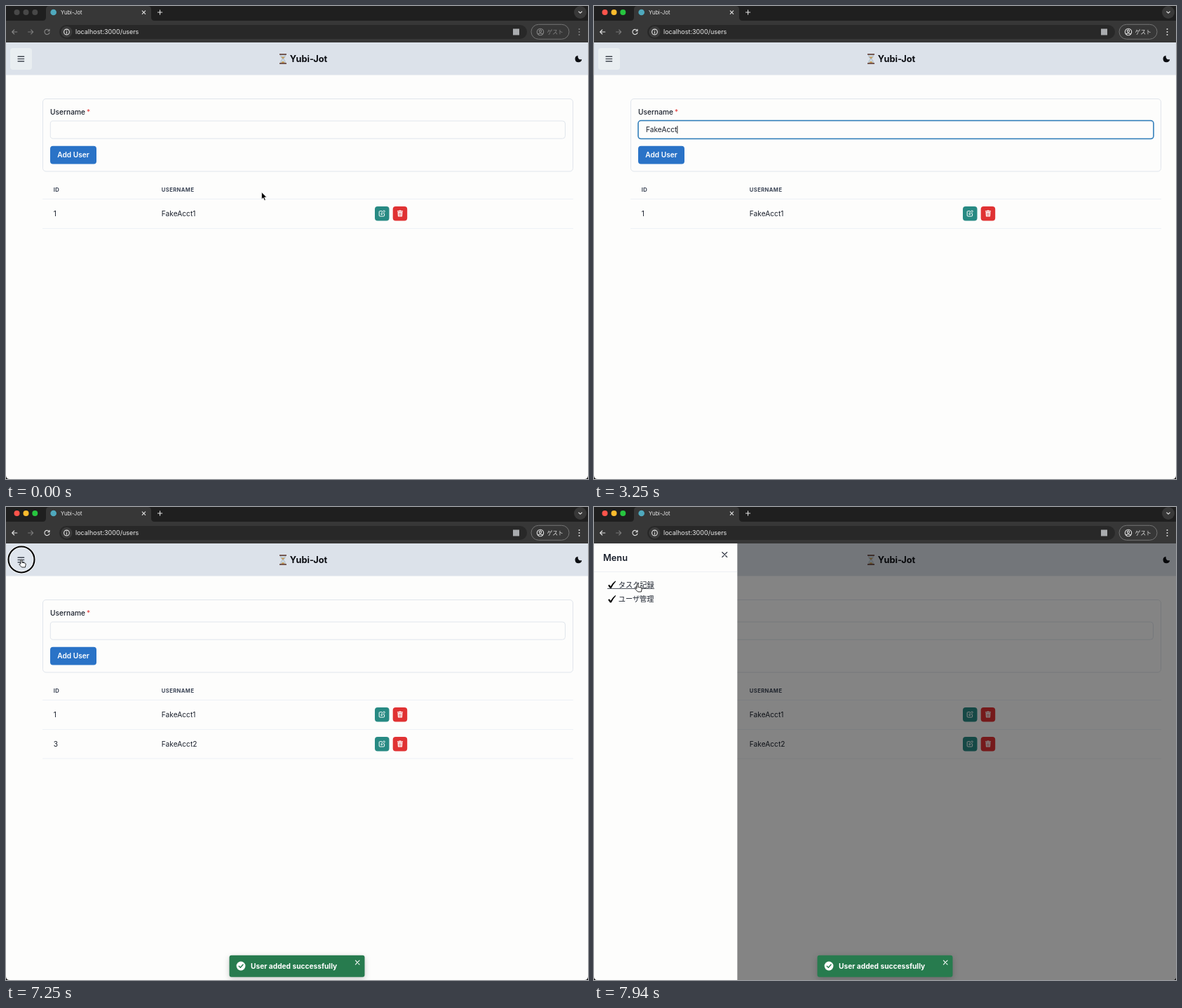
An HTML page for the animation above (8 s loop, 830x675 px).

```html
<!DOCTYPE html>
<html lang="ja">
<head>
<meta charset="utf-8">
<title>Yubi-Jot</title>
<style>
  html, body { margin: 0; width: 830px; height: 675px; overflow: hidden; background: #111; }
  svg { display: block; --icon: #e0e0e0; font: 10.2px Inter, "Noto Sans CJK JP", "Noto Sans CJK", sans-serif; }
  svg.inactive { --icon: #858585; }
  .line { fill: none; stroke-linecap: round; stroke-linejoin: round; }
  .chrome { stroke: var(--icon); stroke-width: 1.1; }
  .inactive .light { fill: #484848; }
  .head { font-size: 7.65px; font-weight: 700; letter-spacing: .05em; fill: #3d4657; }
  .ink { fill: #1a202c; }
</style>
</head>
<body>
<svg id="stage" width="830" height="675" viewBox="0 0 830 675">
  <defs>
    <clipPath id="window"><path d="M0 0H830V670Q830 675 825 675H5Q0 675 0 670Z"/></clipPath>
    <g id="actions">
      <rect x="526" y="286" width="20.5" height="20.5" rx="4" fill="#288a83"/>
      <rect x="551.7" y="286" width="20.5" height="20.5" rx="4" fill="#e03233"/>
      <path class="line" stroke="#fff" d="M536 292.7H533.2Q532.2 292.7 532.2 293.7V299Q532.2 300 533.2 300H538.6Q539.6 300 539.6 299V296.3M535 297.2L535.4 295.3 539 291.7 540.5 293.2 536.9 296.8Z"/>
      <path fill="#fff" d="M558 292.3H560.3L560.8 291.6H563.2L563.7 292.3H566V293.4H558ZM558.6 294H565.4L565 300.6H559Z"/>
      <path stroke="#e03233" stroke-width=".6" d="M560.6 295V299.5M562 295V299.5M563.4 295V299.5"/>
    </g>
    <path id="tick" d="M.3 5.9L2 4.8 4 7.3Q6.5 2.5 10.7-.5L11.4.2Q7.5 4.5 4.8 9.9L3.2 10Z"/>
  </defs>

  <g clip-path="url(#window)">
    <rect y="52" width="830" height="623" fill="#fdfdfc"/>

    <!-- Page -->
    <rect y="52" width="830" height="46.5" fill="#dce2ea"/>
    <rect id="menuButton" x="6" y="60" width="31" height="31" rx="4"/>
    <path class="line" stroke="#1a202c" stroke-width="1.2" d="M17 72.2H25.7M17 75.5H25.7M17 78.8H25.7"/>
    <path fill="#c9d8e2" stroke="#8b98a2" stroke-width=".5" d="M391.5 69.5H398.5Q398.5 73 395.7 75.4 398.5 78 398.5 81.5H391.5Q391.5 78 394.3 75.4 391.5 73 391.5 69.5Z"/>
    <path fill="#c79a55" d="M392.4 72.5H397.6L395 75.4ZM392.2 81.3Q395 76.5 397.8 81.3Z"/>
    <path stroke="#5b3328" stroke-width="1.7" d="M390 69H400M390 82H400"/>
    <text x="404.7" y="80" font-size="12.75" font-weight="700" fill="#0b0d12">Yubi-Jot</text>
    <path fill="#0b0d12" d="M815.2 70.7A4.9 4.9 0 1 0 821.2 76.6Q821.2 76 820.6 76.2A4.1 4.1 0 0 1 815.6 71.2Q815.7 70.6 815.2 70.7Z"/>

    <g fill="none" stroke="#e0e5ec">
      <rect x="52.5" y="132.5" width="756" height="103.5" rx="4.5"/>
      <rect x="63.3" y="164" width="734.2" height="25.2" rx="4"/>
      <path stroke="#edf1f6" d="M52 275.5H809M52 317.5H809"/>
    </g>
    <text x="63" y="154.5" font-weight="500" class="ink">Username</text>
    <text x="115" y="154.5" fill="#e53e3e">*</text>
    <rect id="focus" x="63" y="163.6" width="735" height="26" rx="4" fill="none" stroke="#2b7bb9" stroke-width="1.5"/>
    <text id="entry" x="74" y="180.2" class="ink"></text>
    <path id="caret" stroke="#111" stroke-width=".9" d="M0 171V182"/>
    <rect id="addButton" x="63" y="199.8" width="66" height="25.7" rx="4"/>
    <text x="73.2" y="215.9" font-weight="600" fill="#fff">Add User</text>

    <g class="head"><text x="67.7" y="264.7">ID</text><text x="221.8" y="264.7">USERNAME</text></g>
    <g class="ink"><text x="67.7" y="300">1</text><text x="221.8" y="300">FakeAcct1</text></g>
    <use href="#actions"/>
    <g id="newRow" class="ink">
      <text x="67.7" y="342">3</text><text x="221.8" y="342">FakeAcct2</text>
      <use href="#actions" y="42"/>
      <path stroke="#edf1f6" d="M52 359H809"/>
    </g>

    <!-- Drawer -->
    <rect id="overlay" y="52" width="830" height="623"/>
    <g id="drawer">
      <rect x="-30" y="52" width="234.3" height="623" fill="#fdfdfc"/>
      <text x="13" y="76.6" font-size="12.75" font-weight="600" class="ink">Menu</text>
      <path class="line" stroke="#2d3340" stroke-width="1.1" d="M182.7 64.5L189.7 71.5M189.7 64.5L182.7 71.5"/>
      <path stroke="#edf0f4" d="M0 92.5H204"/>
      <use href="#tick" x="19.7" y="106"/><use href="#tick" x="19.7" y="126.5"/>
      <text x="34.7" y="114.5" class="ink">タスク記録</text>
      <text x="34.7" y="135" class="ink">ユーザ管理</text>
      <path id="underline" stroke="#1a202c" stroke-width=".8" d="M19 116.4H86"/>
    </g>

    <!-- Toast -->
    <g id="toast">
      <rect x="318.5" y="639.7" width="193" height="31" rx="3" fill="#277b4e" style="filter:drop-shadow(0 3px 4px #0003)"/>
      <circle cx="335" cy="655" r="6.4" fill="#fff"/>
      <path class="line" stroke="#277b4e" stroke-width="1.4" d="M332.2 655.2L334.3 657.3 338 653"/>
      <text x="349" y="658.8" font-weight="700" fill="#fff">User added successfully</text>
      <path class="line" stroke="#fff" stroke-width="1.1" d="M498.4 647.2L504 652.8M504 647.2L498.4 652.8"/>
    </g>

    <!-- Browser bar -->
    <rect width="830" height="52" fill="#1f1f1f"/>
    <path fill="#373737" d="M0 21H52Q57 21 57 16V5Q57 0 62 0H202Q207 0 207 5V16Q207 21 212 21H830V52H0Z"/>
    <g>
      <circle class="light" cx="15.5" cy="9" r="4" fill="#ff544b"/>
      <circle class="light" cx="28.5" cy="9" r="4" fill="#fdbb2d"/>
      <circle class="light" cx="41.3" cy="9" r="4" fill="#27c53f"/>
    </g>
    <circle cx="67.7" cy="9" r="4.3" fill="#4fa9bd"/>
    <text x="78" y="11.7" font-size="7.65" fill="#e6e6e6">Yubi-Jot</text>
    <circle cx="819" cy="9" r="9" fill="#383838"/>
    <rect x="76" y="27" width="667" height="20" rx="10" fill="#282828"/>
    <circle cx="86.5" cy="37" r="8" fill="#3b3b3b"/>
    <g class="line" stroke="#e0e0e0" stroke-width="1.1">
      <path d="M194.3 6.9L198.7 11.3M198.7 6.9L194.3 11.3M216.5 9H222.7M219.6 5.9V12.1M816.8 8L819 10.2 821.2 8"/>
      <circle cx="86.5" cy="37" r="3.9"/><path d="M86.5 36.8V38.9M86.5 35V35.1"/>
    </g>
    <g class="line chrome">
      <path d="M15.8 37H8.7M11.7 34L8.7 37 11.7 40M61.8 35.4A3.6 3.6 0 1 0 62 38M62 33.4V35.8H59.6"/>
      <path stroke="#777" d="M31.6 37H38.7M35.7 34L38.7 37 35.7 40"/>
      <circle cx="762" cy="37" r="4.7"/><circle cx="762" cy="35.7" r="1.6"/><path d="M758.9 40Q762 37.2 765.1 40"/>
    </g>
    <text x="99" y="40.2" font-size="9" fill="#ececec">localhost:3000/users</text>
    <rect x="723" y="32.5" width="9" height="9" fill="#a9abae"/>
    <rect x="749" y="26.3" width="54" height="21" rx="10.5" fill="none" stroke="#747474"/>
    <text x="771.5" y="40" font-size="7.8" fill="var(--icon)">ゲスト</text>
    <g fill="var(--icon)"><circle cx="817.5" cy="33" r="1"/><circle cx="817.5" cy="37" r="1"/><circle cx="817.5" cy="41" r="1"/></g>

    <!-- Pointer -->
    <g id="pointer">
      <g id="ring" fill="none"><circle r="18.5" stroke="#fff" stroke-width="3.6"/><circle r="18.5" stroke="#000" stroke-width="2.1"/></g>
      <path id="arrow" stroke="#fff" stroke-width=".8" d="M0 0V10.4L2.4 8.2 4.1 11.9 5.9 11.1 4.2 7.5H7.4Z"/>
      <path id="beam" class="line" stroke="#111" stroke-width="1" d="M-2-5.2Q0-5.2 0-3.8V3.8Q0 5.2-2 5.2M2-5.2Q0-5.2 0-3.8M0 3.8Q0 5.2 2 5.2M-1 1.2H1"/>
      <path id="hand" fill="#fff" stroke="#111" stroke-width=".9" stroke-linejoin="round" d="M-1 6.2V1Q-1 0 0 0T1 1V4.3L2.8 4.5 4.3 4.9 5.5 5.3Q6.3 5.7 6.2 7L5.4 11H.5L-2.9 7.4Q-3.2 6.2-2 6Z"/>
    </g>
  </g>
</svg>
<script>
const LOOP = 8000, STEP = 62.5;
const PRESS_INPUT = 937, PRESS_ADD = 4687, ADDED = 4937, PRESS_MENU = 7187, DRAWER = 7298;
const NAME = "FakeAcct2";
const keys = [1875, 2062, 2187, 2500, 2687, 2875, 3062, 3187, 3562];
// Pointer stops: time, x, y
const path = [
  [0, 364.4, 265.6], [125, 361, 264], [250, 361, 264], [875, 139, 183], [3687, 139, 183],
  [4562, 97, 213], [4875, 97, 213], [5625, 276, 335], [5687, 276, 335],
  [6562, 70, 125], [6687, 70, 125], [7125, 22, 75], [7375, 22, 75], [7875, 62, 110], [8000, 62, 110]
];

const el = Object.fromEntries([...document.querySelectorAll("[id]")].map(e => [e.id, e]));
const show = (e, on) => e.style.display = on ? "" : "none";
const clamp = v => Math.max(0, Math.min(1, v));
const smooth = v => v * v * (3 - 2 * v);
const between = (t, a, b) => t >= a && t < b;
const inside = (x, y, left, top, right, bottom) => x >= left && x <= right && y >= top && y <= bottom;

function pointerAt(t) {
  const i = path.findIndex(stop => stop[0] > t);
  const [t0, x0, y0] = path[i - 1], [t1, x1, y1] = path[i];
  const k = smooth((t - t0) / (t1 - t0));
  return [x0 + (x1 - x0) * k, y0 + (y1 - y0) * k];
}

// Slightly underdamped spring, stiffness 180 and damping 25
function spring(s) {
  const decay = 12.5, w = Math.sqrt(180 - decay * decay);
  return 1 - Math.exp(-decay * s) * (Math.cos(w * s) + decay / w * Math.sin(w * s));
}

function draw(t) {
  const [x, y] = pointerAt(t);
  const open = t >= DRAWER;
  const onLink = open && inside(x, y, 19, 104, 87, 119);
  const onMenu = !open && inside(x, y, 6, 60, 37, 91);
  const onAdd = !open && inside(x, y, 63, 200, 129, 226);
  const onInput = !open && inside(x, y, 63, 164, 798, 189);
  const onHand = onLink || onMenu || onAdd;
  const focused = between(t, PRESS_INPUT, PRESS_ADD);

  el.stage.classList.toggle("inactive", t < PRESS_INPUT);
  el.menuButton.setAttribute("fill", onMenu ? "#dfe5ed" : "#e9eef1");
  el.addButton.setAttribute("fill", onAdd ? "#2869b2" : "#2a73c7");

  const typed = keys.filter(k => k <= t).length;
  el.entry.textContent = t < ADDED ? NAME.slice(0, typed) : "";
  const lastInput = Math.max(PRESS_INPUT, ...keys.filter(k => k <= t));
  show(el.focus, focused);
  show(el.caret, focused && (t - lastInput) % 1000 < 500);
  el.caret.setAttribute("transform", `translate(${74.4 + (typed ? el.entry.getComputedTextLength() : 0)} 0)`);

  show(el.newRow, t >= ADDED);
  const rise = smooth(clamp((t - ADDED) / 400));
  el.toast.setAttribute("opacity", rise);
  el.toast.setAttribute("transform", `translate(0 ${15 * (1 - rise)})`);

  show(el.drawer, open);
  el.overlay.setAttribute("opacity", .48 * (1 - (1 - clamp((t - DRAWER) / 200)) ** 2.9));
  el.drawer.setAttribute("transform", `translate(${204 * (spring(Math.max(0, t - DRAWER) / 1000) - 1)} 0)`);
  show(el.underline, onLink);

  show(el.pointer, !between(t, keys[0], 3750));
  el.pointer.setAttribute("transform", `translate(${x} ${y})`);
  show(el.ring, between(t, PRESS_INPUT, 1062) || between(t, PRESS_ADD, ADDED) || between(t, PRESS_MENU, DRAWER));
  show(el.hand, onHand);
  show(el.beam, onInput);
  show(el.arrow, !onHand && !onInput);
}

function tick() {
  const t = performance.now() % LOOP;
  draw(Math.min(Math.floor((t + 5) / STEP) * STEP, LOOP - STEP));
  requestAnimationFrame(tick);
}
tick();
</script>
</body>
</html>
```
